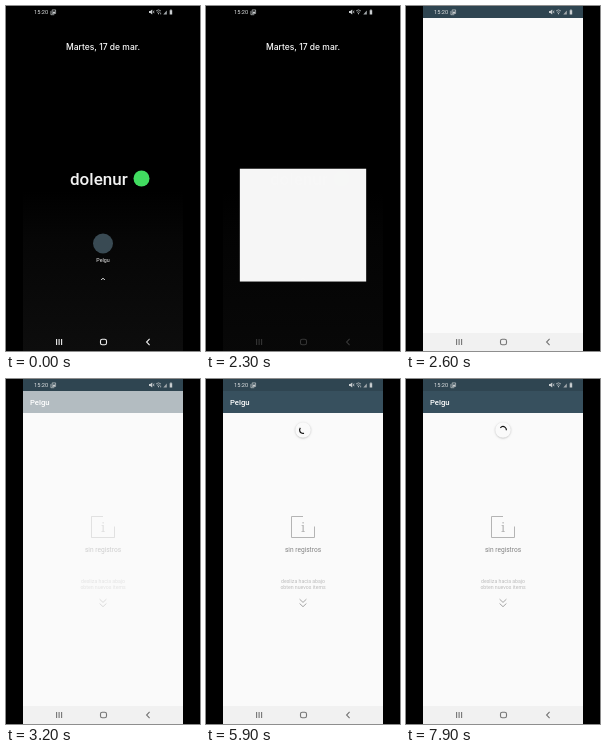
An HTML page with a canvas that plays this animation: 194x345 px, repeating every 8000 ms.

```html
<!DOCTYPE html>
<html lang="es">
<head>
<meta charset="utf-8">
<style>
html, body { margin: 0; width: 100%; height: 100%; overflow: hidden; background: #000; }
canvas { display: block; width: 194px; height: 345px; }
</style>
</head>
<body>
<canvas id="stage"></canvas>
<script>
const W = 194, H = 345, LOOP = 8000, TAU = Math.PI * 2;
const LEFT = 17, WIDTH = 160, CX = 97;
const canvas = document.getElementById('stage');
const ctx = canvas.getContext('2d');
const dpr = window.devicePixelRatio || 1;
canvas.width = W * dpr;
canvas.height = H * dpr;

const clamp = v => Math.max(0, Math.min(1, v));
const progress = (t, from, to) => clamp((t - from) / (to - from));
const mix = (a, b, p) => a + (b - a) * p;
const smooth = p => p * p * (3 - 2 * p);

function rect(x, y, w, h, color) {
  ctx.fillStyle = color;
  ctx.fillRect(x, y, w, h);
}

function disc(x, y, r, color) {
  ctx.fillStyle = color;
  ctx.beginPath();
  ctx.arc(x, y, r, 0, TAU);
  ctx.fill();
}

function stroke(d, color, width = 1) {
  ctx.strokeStyle = color;
  ctx.lineWidth = width;
  ctx.stroke(new Path2D(d));
}

function fillPath(d, color) {
  ctx.fillStyle = color;
  ctx.fill(new Path2D(d));
}

function text(s, x, y, size, color, align = 'center', weight = 400, family = 'Roboto, sans-serif') {
  ctx.font = `${weight} ${size}px ${family}`;
  ctx.textAlign = align;
  ctx.fillStyle = color;
  ctx.fillText(s, x, y);
}

function withAlpha(alpha, draw) {
  ctx.save();
  ctx.globalAlpha *= alpha;
  draw();
  ctx.restore();
}

function statusBar(t) {
  const c = '#c9cdcf';
  text('15:20', 28, 8.3, 5.7, '#e0e3e4', 'left');
  stroke('M44.9 5.1V8.7H48.3M46.2 3.9H49.6V7.5H46.2Z', c, .7);
  rect(46.8, 5.6, 2.3, 1.5, c);
  fillPath('M143 4.9H144.3L146.2 3.4V8.6L144.3 7.1H143Z', c);
  stroke('M146.8 4.6L148.2 7.2M148.2 4.6L146.8 7.2', c, .6);
  stroke('M150 5Q152.5 2.7 155 5M151.1 6.4Q152.5 5.2 153.9 6.4', c, .7);
  disc(152.5, 7.7, .6, c);
  if (t < 900 || (t >= 3000 && t < 3800) || (t >= 5800 && t < 6600)) rect(154.4, 6.6, .7, 1.8, c);
  fillPath('M157.3 8.5L160.8 4.5V8.5Z', '#a4aaad');
  rect(163.7, 4.2, 2.5, 4.3, c);
  rect(164.3, 3.5, 1.3, .8, c);
}

function navButtons(color) {
  stroke('M50.6 333V339M53.1 333V339M55.6 333V339', color, 1.1);
  ctx.strokeStyle = color;
  ctx.beginPath();
  ctx.roundRect(94.5, 333.2, 6, 5.6, 1.8);
  ctx.stroke();
  stroke('M143.6 332.9L140.6 336L143.6 339.1', color, 1.1);
}

function touch(x, y, rgb, alpha) {
  const g = ctx.createRadialGradient(x, y, 0, x, y, 5.5);
  g.addColorStop(0, `rgba(${rgb},${alpha})`);
  g.addColorStop(.65, `rgba(${rgb},${alpha * .85})`);
  g.addColorStop(1, `rgba(${rgb},0)`);
  disc(x, y, 5.5, g);
}

function home(t) {
  const fade = progress(t, 2000, 2300);
  const g = ctx.createLinearGradient(0, 185, 0, H);
  g.addColorStop(0, '#000');
  g.addColorStop(.3, '#060606');
  g.addColorStop(1, '#0d0d0d');
  withAlpha(mix(1, .6, fade), () => rect(LEFT, 0, WIDTH, H, g));
  text('Martes, 17 de mar.', CX, 44.1, 8.5, '#fafafa', 'center', 500, 'Inter, sans-serif');
  withAlpha(mix(1, .2, fade), () => {
    text('dolenur', 64, 179.3, 17, '#f2f2f2', 'left', 500);
    disc(135.5, 172.5, 8, '#41dc60');
    disc(CX, 237.5, 10, '#394a53');
    if (t >= 1800 && t < 2000) touch(97.5, 237, '255,255,255', .9);
    text('Pelgu', CX, 256, 5.3, '#eee');
    stroke('M95.2 274L97 272.2L98.8 274', '#eee');
    navButtons('#f0f0f0');
  });
}

// Opening window: time, left, top, right, bottom
const windowKeys = [
  [2000, 92, 232, 102, 242],
  [2200, 66, 207, 130, 258],
  [2300, 34, 164, 160, 275],
  [2400, 17, 37, 177, 329],
  [2500, 17, 7, 177, 341],
  [2600, 17, 0, 177, 345]
];

function openingWindow(t) {
  const i = windowKeys.findIndex(k => k[0] > t);
  const a = windowKeys[i - 1], b = windowKeys[i];
  const p = progress(t, a[0], b[0]);
  const [, x0, y0, x1, y1] = a.map((v, n) => mix(v, b[n], p));
  withAlpha(mix(0, .985, progress(t, 2000, 2300)), () => rect(x0, y0, x1 - x0, y1 - y0, '#fafafa'));
  if (t >= 2400) withAlpha(progress(t, 2400, 2550), () => {
    rect(LEFT, 0, WIDTH, 12, '#2f4551');
    rect(LEFT, 327, WIDTH, 18, '#f1f1f1');
  });
}

function emptyState() {
  stroke('M97 137.5H85.5V158.5H108.5V147.5', '#b4b4b4');
  text('i', CX, 153, 13, '#b4b4b4', 'center', 400, '"Noto Serif", serif');
  text('sin registros', CX, 173.3, 6.6, '#858585');
  text('desliza hacia abajo', CX, 204, 5.2, '#bcbcbc');
  text('obten nuevos items', CX, 210, 5.2, '#bcbcbc');
  stroke('M93.6 220.2L97 223.4L100.4 220.2M93.6 224.5L97 227.7L100.4 224.5', '#a5a5a5');
}

const TARGET = 26, PULL = 4900, RELEASE = 5350, SPIN = 5567, CYCLE = 1332;
const fingerY = t => mix(122, 262, smooth(progress(t, PULL, RELEASE)));

// Pull distance with resistance past the trigger point
function pullOffset(t) {
  const drag = (fingerY(t) - 122) / 2;
  const tension = Math.min(Math.max(0, drag - TARGET), TARGET * 2) / TARGET / 4;
  return TARGET * Math.min(1, drag / TARGET) + TARGET * 2 * (tension - tension ** 2) * 2;
}

function spinnerArc(t) {
  if (t < SPIN) {
    const pull = clamp(pullOffset(t) / TARGET);
    const start = -.25 + .4 * pull;
    return [start, start + .8 * pull];
  }
  const cycles = (t - SPIN) / CYCLE, n = Math.floor(cycles), p = cycles - n;
  const turn = cycles * (.6 + .21) + n * .79;
  const tail = .79 * smooth(clamp(p * 2 - 1));
  const head = .79 * smooth(clamp(p * 2)) + .01;
  return [turn + tail, turn + head];
}

function spinner(t) {
  const settle = 1 - (1 - progress(t, RELEASE, SPIN)) ** 2;
  const y = 25 + mix(pullOffset(t), TARGET, settle);
  ctx.save();
  ctx.beginPath();
  ctx.rect(LEFT, 34, WIDTH, 293);
  ctx.clip();
  ctx.shadowColor = 'rgba(0,0,0,.25)';
  ctx.shadowBlur = 2 * dpr;
  ctx.shadowOffsetY = .6 * dpr;
  disc(CX, y, 7.8, '#fafafa');
  ctx.shadowColor = 'transparent';
  const [from, to] = spinnerArc(t);
  ctx.globalAlpha = t < SPIN ? mix(.3, 1, progress(pullOffset(t), 20, TARGET)) : 1;
  ctx.strokeStyle = '#111';
  ctx.lineWidth = 1.2;
  ctx.beginPath();
  ctx.arc(CX, y, 3.4, from * TAU, to * TAU);
  ctx.stroke();
  ctx.restore();
}

function app(t) {
  rect(LEFT, 0, WIDTH, H, '#fafafa');
  rect(LEFT, 0, WIDTH, 12, '#2f4551');
  withAlpha(t < 3200 ? 0 : mix(.36, 1, progress(t, 3200, 3300)), () => {
    rect(LEFT, 12, WIDTH, 22, '#37505e');
    emptyState();
  });
  if (t >= 3200) text('Pelgu', 24, 26, 7.7, '#fff', 'left', 500);
  if (t >= PULL) spinner(t);
  if (t >= PULL && t < RELEASE) touch(CX, fingerY(t), '120,120,120', .4);
  rect(LEFT, 327, WIDTH, 18, '#f1f1f1');
  navButtons('#757575');
}

function draw(now) {
  const t = now % LOOP;
  ctx.setTransform(dpr, 0, 0, dpr, 0, 0);
  rect(0, 0, W, H, '#000');
  if (t < 2600) home(t);
  else app(t);
  if (t >= 2000 && t < 2600) openingWindow(t);
  statusBar(t);
  requestAnimationFrame(draw);
}
requestAnimationFrame(draw);
</script>
</body>
</html>
```
